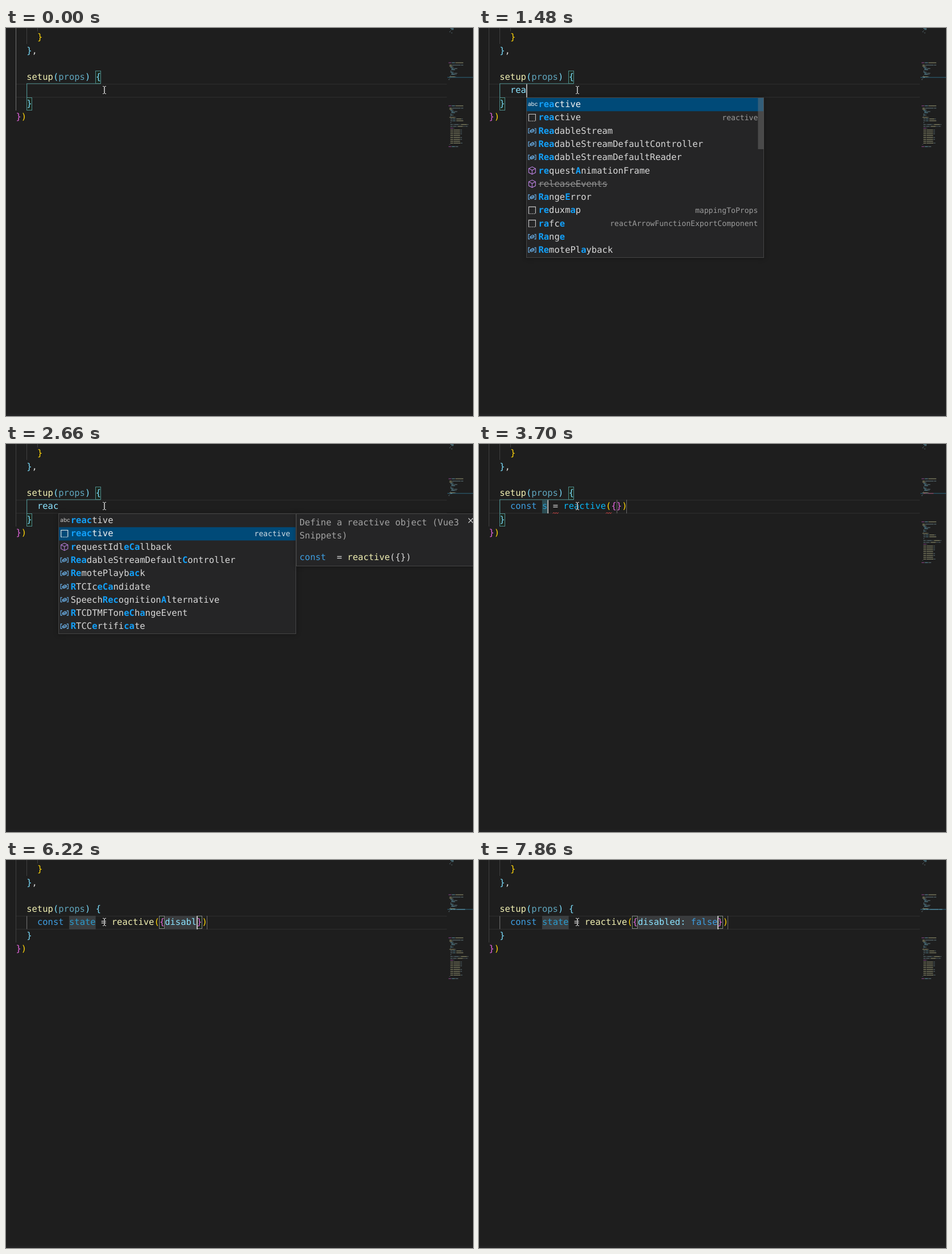
These frames come from a looping animation (821 by 682 pixels, 8000 ms). An HTML page with a canvas:

```html
<!DOCTYPE html>
<html lang="en">
<head>
<meta charset="utf-8">
<title>Code editor autocomplete</title>
<style>
html, body { margin: 0; width: 100%; height: 100%; overflow: hidden; background: #1e1e1e; }
canvas { display: block; }
</style>
</head>
<body>
<canvas id="stage" width="821" height="682"></canvas>
<script>
const ctx = document.getElementById('stage').getContext('2d');
const LOOP = 8000, FONT = 15.52, CHAR = 9.345, LINE = 23.27, LINE_TOP = 98.4;
const MONO = '"DejaVu Sans Mono", monospace';
const C = {
  bg: '#1e1e1e', fg: '#d8d8d8', blue: '#3d9de0', light: '#8be3ff', fn: '#f0efb2', prop: '#5fa5bd',
  gold: '#ffd60a', pink: '#e265dc', sky: '#7bdcfb', state: '#2b9cce', cyan: '#08b5f4',
  match: '#12a0fa', teal: '#4d8b8b', gray: '#a3a3a3', purple: '#b77fdc', symbol: '#6fb9f5'
};

// Typed text: [time, text] pairs, the last one reached is current.
const WORD = [[0, ''], [890, 'r'], [1040, 're'], [1480, 'rea'], [1930, 'reac']];
const NAME = [[0, ''], [3700, 's'], [3850, 'st'], [3990, 'sta'], [4140, 'stat'], [4290, 'state']];
const BODY = [[0, ''], [5030, 'd'], [5180, 'di'], [5470, 'dis'], [5920, 'disa'], [6220, 'disabl'],
  [6370, 'disable'], [6670, 'disabled'], [6970, 'disabled:'], [7270, 'disabled: '], [7420, 'disabled: f'],
  [7560, 'disabled: fa'], [7710, 'disabled: fals'], [7860, 'disabled: false']];
const INSERTED = 2960, IN_BODY = 4590;

// Suggestion rows: icon letter, label with [matched] parts, optional detail after "|".
const LISTS = {
  r: `m [r]emoveEventListener
m [r]equestAnimationFrame
m [r]equestIdleCallback
m [r]esizeBy
m [r]esizeTo
k [r]eturn
t [r]eactive
d releaseEvents
s [r]afc|reactArrowFunctionComponent
s [r]afce|reactArrowFunctionExportComponent
s [r]afcp|reactArrowFunctionComponentWithP…
s [r]cc|reactClassCompoment`,
  re: `m [re]moveEventListener
m [re]questAnimationFrame
m [re]questIdleCallback
m [re]sizeBy
m [re]sizeTo
k [re]turn
t [re]active
d releaseEvents
s [re]active|reactive
s [re]duxmap|mappingToProps
v [Re]adableStream
v [Re]adableStreamDefaultController`,
  rea: `t [rea]ctive
s [rea]ctive|reactive
v [Rea]dableStream
v [Rea]dableStreamDefaultController
v [Rea]dableStreamDefaultReader
m [re]quest[A]nimationFrame
d releaseEvents
v [Ra]nge[E]rror
s [re]duxm[a]p|mappingToProps
s [ra]fc[e]|reactArrowFunctionExportComponent
v [Ra]ng[e]
v [Re]motePl[a]yback`,
  reac: `t [reac]tive
s [reac]tive|reactive
m [r]equestIdl[eCa]llback
v [Rea]dableStreamDefault[C]ontroller
v [Re]motePlayb[ac]k
v [R]TCIc[eCa]ndidate
v Speech[Rec]ognition[A]lternative
v [R]TCDTMFTon[eC]h[a]ngeEvent
v [R]TCC[e]rtifi[ca]te`
};
const SIGNATURE = `function removeEventListener<K
extends keyof WindowEventMap>(t
ype: K, listener: (this: Windo
w, ev: WindowEventMap[K]) => an
y, options?: boolean | EventLis
tenerOptions): void (+1 overloa
d)`.split('\n');

const COMPONENT = `export default defineComponent({

  name: 'ButtonComponent', props
  props: {
    size: {
      type: String,
      default:
    },
    kind: {
      type: String,
      default: ''`.split('\n');
const SETUP = `    const size = computed(() =>
    const kind = useProps(props)
    //
    const { isDisabled } = toRefs(props, x)
    const classes = computed(() => [ 'y' ]
    return {
    block: isBlock.value, [p]
    round: isRound.value, [p]
    plain: isPlain.value, [p]
    large: isLarge.value,
    small: isSmall.value, [p]
    ghost: isGhost.value, [p]
    outer: isOuter.value,
    class: hasClass.value, [c]`.split('\n');

const at = (keys, t) => keys.filter(k => k[0] <= t).pop()[1];
const colX = col => 17.5 + CHAR * col;

function rect(x, y, w, h, color) {
  ctx.fillStyle = color;
  ctx.fillRect(x, y, w, h);
}
function frame(x, y, w, h, color) {
  ctx.strokeStyle = color;
  ctx.lineWidth = 1;
  ctx.strokeRect(Math.round(x) + .5, Math.round(y) + .5, Math.round(w) - 1, Math.round(h) - 1);
}
function text(str, x, y, color, size = FONT, weight = '', family = MONO) {
  ctx.font = `${weight} ${size}px ${family}`;
  ctx.fillStyle = color;
  ctx.fillText(str, x, y);
}
function runs(parts, x, y) {
  for (const [str, color, weight] of parts) {
    text(str, x, y, color, FONT, weight);
    x += str.length * CHAR;
  }
}
function path(points, color, closed) {
  ctx.beginPath();
  points.forEach(([x, y]) => ctx.lineTo(x, y));
  if (closed) ctx.closePath();
  ctx.strokeStyle = color;
  ctx.stroke();
}
const code = (parts, col, row) => runs(parts, colX(col), 114.4 + row * LINE);
function bracketBox(col, row, color) {
  const x = Math.floor(colX(col)), y = Math.round(LINE_TOP + row * LINE);
  rect(x, y, 10, 23, 'rgba(0,100,0,.1)');
  frame(x, y, 10, 23, color);
}

function miniLine(line, y, color) {
  ctx.globalAlpha = .5;
  for (const word of line.matchAll(/\S+/g)) {
    const tint = color || (/^(type|default|size|kind)/.test(word[0]) ? C.light
      : /^(export|return)/.test(word[0]) ? C.pink
      : /\(|\w:$|value/.test(word[0]) ? C.fn : '#8fb6c2');
    rect(778 + word.index * .81, y, word[0].length * .81, 1.2, tint);
  }
  ctx.globalAlpha = 1;
}
function minimap(line, error) {
  const block = (lines, top, pitch) => lines.forEach((s, i) => miniLine(s, top + i * pitch));
  block(['    default', '      type:', '    }', '  },', '      })'], 0, 2);
  block([...COMPONENT, '    }', '  setup(props) {'], 60.5, 2.05);
  rect(776, 86.2, 45, 1.2, '#2b5b70');
  miniLine('    ' + line, 86.2, error ? '#ff4060' : C.light);
  block(['  }', '})'], 88, 2);
  block(COMPONENT.slice(0, 9).concat('    }', '  setup(props) {'), 136.2, 2.03);
  block(SETUP, 159.2, 3.27);
  block(['  }', '', 'export default Button'], 204, 1.95);
}

function icon(kind, x, y, selected) {
  const line = selected ? '#f0f0f0' : '#c8c8c8';
  ctx.lineWidth = 1.1;
  if (kind === 'm' || kind === 'd') {
    const color = selected ? '#f0f0f0' : C.purple;
    const hex = [[0, -6.5], [6, -3.5], [6, 3.5], [0, 6.5], [-6, 3.5], [-6, -3.5]].map(([a, b]) => [x + a, y + b]);
    path(hex, color, true);
    path([hex[5], [x, y - .5], hex[1]], color);
    path([[x, y - .5], hex[3]], color);
  } else if (kind === 'v') {
    for (const s of [-1, 1]) path([[x + s * 4, y - 4], [x + s * 6.5, y - 4], [x + s * 6.5, y + 4], [x + s * 4, y + 4]], C.symbol);
    path([[-3.5, 0], [1, -3], [3.5, -1.5], [3.5, 1], [-1, 3], [-3.5, 2]].map(([a, b]) => [x + a, y + b]), C.symbol, true);
    path([[x - 3.5, y], [x - 1, y + 1], [x + 3.5, y - 1.5]], C.symbol);
  } else if (kind === 's') {
    path([[x - 6, y + 6], [x - 6, y - 6], [x + 6, y - 6], [x + 6, y + 6]], line);
    for (let i = -6; i < 6; i += 3) rect(x + i, y + 5.5, 1.7, 1.1, line);
  } else if (kind === 'k') {
    [7, 12, 9, 13].forEach((w, i) => rect(x - 6, y - 5 + i * 3.4, w, 1.1, line));
    rect(x + 3, y - 5, 4, 1.1, line);
    rect(x + 5, y + 1.8, 2, 1.1, line);
  } else {
    text('abc', x - 7.5, y + 3, line, 10, '', 'Inter, sans-serif');
  }
}

function box(x, y, w, h) {
  ctx.shadowColor = 'rgba(0,0,0,.35)';
  ctx.shadowBlur = 8;
  rect(x, y, w, h, '#252526');
  ctx.shadowBlur = 0;
  ctx.shadowColor = 'transparent';
  frame(x, y, w, h, '#454545');
}

function popup(word, selected) {
  const rows = LISTS[word].split('\n'), x = colX(4 + word.length), top = 122;
  box(x, top, 418, rows.length * LINE + 2.5);
  rows.forEach((row, i) => {
    const [label, detail] = row.slice(2).split('|');
    const kind = row[0], y = top + 17.2 + i * LINE, active = i === selected;
    if (active) rect(Math.round(x) + 1, top + 1 + i * LINE, 416, LINE, '#004a78');
    icon(kind, x + 10.5, y - 5, active);
    const color = kind === 'd' ? '#929292' : active ? '#f4f4f4' : C.fg;
    runs(label.split(/[\[\]]/).map((s, n) => n % 2 ? [s, C.match, 'bold'] : [s, color]), x + 21.5, y);
    if (kind === 'd') rect(x + 21.5, y - 5, label.length * CHAR, 1.2, color);
    if (detail) {
      ctx.textAlign = 'right';
      const end = x + (detail.endsWith('…') ? 400.5 : 407.4);
      text(detail, end, y - .5, active ? '#d0dbe4' : '#9c9c9c', 13.1);
      ctx.textAlign = 'left';
    }
  });
  if (word === 'rea') rect(x + 407.5, top + 1, 10, 90, 'rgba(121,121,121,.42)');
  return Math.round(x) + 418;
}

function detailPanel(x, height) {
  box(x, 122, 322, height);
  ctx.lineWidth = 1.2;
  for (const s of [-1, 1]) path([[x + 303, 134.5 - 4 * s], [x + 311, 134.5 + 4 * s]], '#d0d0d0');
}

function suggestions(word, t) {
  const selected = t >= 2370 ? 1 : 0, x = popup(word, selected);
  if (word === 'r' || word === 're') {
    detailPanel(x, 175);
    SIGNATURE.forEach((s, i) => text(s, x + 6, 143 + i * 22.6, C.gray));
  } else if (t >= 2520) {
    detailPanel(x, 92.5);
    text('Define a reactive object (Vue3', x + 6, 143, C.gray);
    text('Snippets)', x + 6, 165.6, C.gray);
    runs([['const', C.blue], ['  = ', C.fg], ['reactive', C.fn], ['({})', C.fg]], x + 6, 203.7);
  }
}

function squiggle(col) {
  const x = colX(col), points = [];
  for (let i = 0; i <= 5; i++) points.push([x + i * 2, i % 2 ? 120.3 : 122.3]);
  ctx.lineWidth = 1;
  path(points, '#f04848');
}

function mouse() {
  for (const [color, width] of [['#161616', 2.2], ['#dcdcdc', 1]]) {
    ctx.lineWidth = width;
    for (const s of [-1, 1]) {
      path([[173 + 3 * s, 102.5], [173 + s, 102.5], [173, 104], [173, 114], [173 + s, 115.5], [173 + 3 * s, 115.5]], color);
    }
  }
}

function draw(t) {
  const word = at(WORD, t), name = at(NAME, t), body = at(BODY, t);
  const inserted = t >= INSERTED, inBody = t >= IN_BODY, error = t >= 3250 && t < 3990;
  const openCol = 4 + 6 + name.length + 3 + 9, bodyCol = openCol + 1, closeCol = bodyCol + body.length;
  const line = inserted ? `const ${name} = reactive({${body}})` : word;

  rect(0, 0, 821, 682, C.bg);
  rect(0, 678, 821, 4, '#222223');
  rect(17, 98.3, 758, 1, '#303030');
  rect(17, 121.2, 758, 1, '#303030');
  rect(17, 0, 1, 145, t < 890 ? '#707070' : '#404040');
  rect(36, 0, 1, 28, '#404040');
  rect(55, 0, 1, 6, '#404040');
  minimap(line, error);

  if (inBody) {
    rect(36, 98.5, 1.2, 23, '#686868');
  } else {
    bracketBox(15, -1, C.teal);
    bracketBox(2, 1, C.teal);
    rect(36, 97.3, 130, 1, C.teal);
    rect(36, 98, 1.2, 24, C.teal);
  }

  code([['}', C.gold]], 4, -4);
  code([['}', C.sky], [',', C.fg]], 2, -3);
  code([['setup', C.fn], ['(', C.sky], ['props', C.prop], [')', C.sky], [' {', C.sky]], 2, -1);
  code([['}', C.sky]], 2, 1);
  code([['}', C.pink], [')', C.gold]], 0, 2);

  let caretCol = 4 + word.length;
  if (inserted) {
    caretCol = inBody ? closeCol : 10 + name.length;
    rect(colX(10), 98, Math.max(1.5, name.length * CHAR), 24, inBody ? '#3a3e40' : '#2b4c53');
    rect(colX(bodyCol), 98, Math.max(1.5, body.length * CHAR), 24, body ? '#393b3d' : '#555');
    rect(Math.round(colX(closeCol + 2)) - 1, 98, 1, 24, '#686868');
    if (inBody) {
      bracketBox(openCol, 0, '#858585');
      bracketBox(closeCol, 0, '#858585');
    }
    const [key, value = ''] = body.split(/(?<=: )/);
    code([['const ', C.blue], [name, C.state], [' = ', C.fg], ['reactive', t < 3990 ? C.cyan : C.fn],
      ['(', C.gold], ['{', C.pink], [key, C.light], [value, value === 'false' ? C.blue : C.light],
      ['}', C.pink], [')', C.gold]], 4, 0);
    if (error) [openCol - 11, openCol - 1].forEach(squiggle);
  } else {
    code([[word, C.light]], 4, 0);
  }

  const caretOff = t < 150 || (t >= 590 && t < 890) || (t >= 2660 && t < INSERTED);
  if (!caretOff) rect(colX(caretCol) + .2, 98.5, 1.5, 23.5, '#d8d8d8');
  mouse();
  if (word && !inserted) suggestions(word, t);
}

ctx.textRendering = 'geometricPrecision';
const start = performance.now();
function tick() {
  draw((performance.now() - start) % LOOP);
  requestAnimationFrame(tick);
}
draw(0);
requestAnimationFrame(tick);
</script>
</body>
</html>
```
